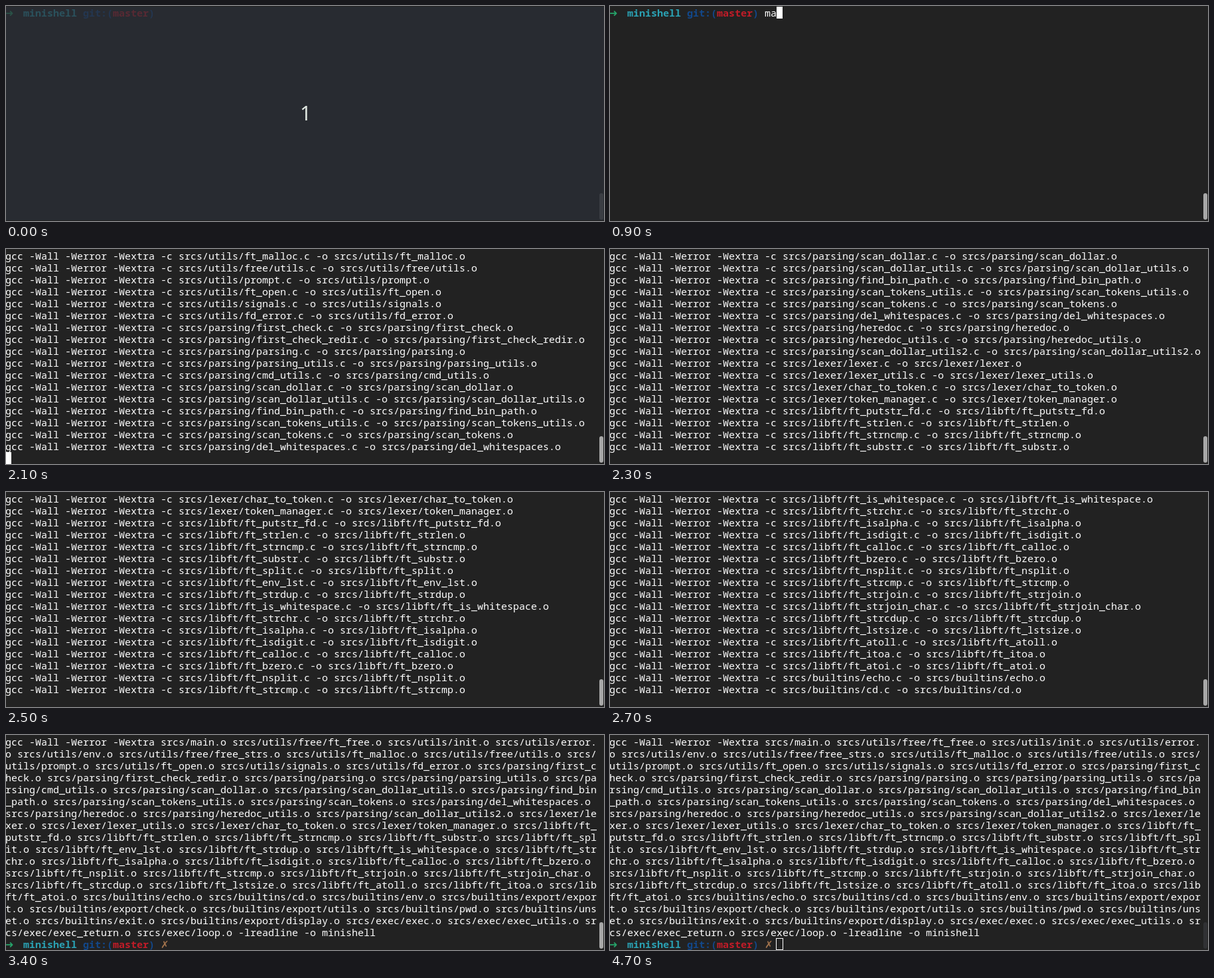
Recreate the animation shown at these times as an HTML page with a canvas. Size 901 by 325 pixels, loop 4.8 s.

```html
<!DOCTYPE html>
<html lang="en">
<head>
<meta charset="utf-8">
<title>Building minishell</title>
<style>
html, body { margin: 0; width: 100%; height: 100%; overflow: hidden; background: #222; }
canvas { display: block; }
</style>
</head>
<body>
<canvas id="stage" width="901" height="325"></canvas>
<script>
const ctx = document.getElementById('stage').getContext('2d');
const W = 901, H = 325, LOOP = 4800;
const CELL = 9, ROW = 18, LEFT = -1, TOP = 1, BASE = 15, ROWS = 18, COLS = 99;
const MONO = '15px "Noto Sans Mono", monospace';
const PLAIN = '500 ' + MONO, BOLD = 'bold ' + MONO;
const SYMBOL = 'bold 15px "DejaVu Sans", sans-serif';

const group = (dir, names) => names.split(' ').map(n => `srcs/${dir}${n}`);
const files = [
  ...group('', 'main'),
  ...group('utils/', 'free/ft_free init error env free/free_strs ft_malloc free/utils prompt ft_open signals fd_error'),
  ...group('parsing/', 'first_check first_check_redir parsing parsing_utils cmd_utils scan_dollar scan_dollar_utils ' +
    'find_bin_path scan_tokens_utils scan_tokens del_whitespaces heredoc heredoc_utils scan_dollar_utils2'),
  ...group('lexer/', 'lexer lexer_utils char_to_token token_manager'),
  ...group('libft/ft_', 'putstr_fd strlen strncmp substr split env_lst strdup is_whitespace strchr isalpha isdigit ' +
    'calloc bzero nsplit strcmp strjoin strjoin_char strcdup lstsize atoll itoa atoi'),
  ...group('builtins/', 'echo cd env export/export export/check export/utils pwd unset exit export/display'),
  ...group('exec/', 'exec exec_utils exec_return loop')
];

const GCC = 'gcc -Wall -Werror -Wextra ';
const compileLines = files.map(f => `${GCC}-c ${f}.c -o ${f}.o`);
const linkText = GCC + files.map(f => f + '.o').join(' ') + ' -lreadline -o minishell';
const linkLines = linkText.match(new RegExp(`.{1,${COLS}}`, 'g'));

// Last value whose start time has been reached
const at = (t, steps) => steps.reduce((v, [start, next]) => t >= start ? next : v, steps[0][1]);

const typed = [[0, ''], [900, 'ma'], [1100, 'mak'], [1200, 'make']];
const compiled = [[0, 0], [1700, 5], [1800, 10], [1900, 14], [2000, 19], [2100, 23], [2200, 28],
  [2300, 34], [2400, 40], [2500, 45], [2600, 49], [2700, 54], [2800, 59], [2900, 63]];
const cursorMode = [[0, 'off'], [100, 'solid'], [2200, 'off'], [2900, 'solid'], [3400, 'off'],
  [4000, 'solid'], [4600, 'hollow']];
const thumbColor = [[0, '#606060'], [100, '#8c8c8c'], [200, '#a8a8a8'], [4600, '#6c6c6c'], [4700, '#303134']];
const veilAlpha = [[0, 1], [100, 0.4], [200, 0]];

function put(text, col, row, color = '#fff', font = PLAIN) {
  ctx.font = font;
  ctx.fillStyle = color;
  ctx.fillText(text, LEFT + col * CELL, TOP + row * ROW + BASE);
}

function prompt(row, command, dirty) {
  put('➜', 0, row, '#26a269', SYMBOL);
  put('minishell', 3, row, '#2aa1b3', BOLD);
  put('git:(', 13, row, '#12488b', BOLD);
  put('master', 18, row, '#c01c28', BOLD);
  put(')', 24, row, '#12488b', BOLD);
  if (dirty) put('✗', 26, row, '#a2734c', SYMBOL);
  put(command, 26, row);
}

function cursor(col, row, mode) {
  const x = LEFT + col * CELL, y = TOP + row * ROW;
  if (mode === 'solid') {
    ctx.fillStyle = '#fff';
    ctx.fillRect(x, y, CELL, ROW);
  } else if (mode === 'hollow') {
    ctx.strokeStyle = '#fff';
    ctx.lineWidth = 1;
    ctx.strokeRect(x - 0.5, y + 0.5, CELL + 1, ROW - 1);
  }
}

function terminal(t) {
  const mode = at(t, cursorMode);
  if (t >= 3000) {
    linkLines.forEach((line, row) => put(line, 0, row));
    prompt(ROWS - 1, '', true);
    cursor(28, ROWS - 1, mode);
    return;
  }
  const command = at(t, typed), count = at(t, compiled);
  const scroll = Math.max(0, count + 2 - ROWS);
  if (!scroll) prompt(0, command, false);
  for (let i = Math.max(0, scroll - 1); i < count; i++) put(compileLines[i], 0, i + 1 - scroll);
  if (count) cursor(0, count + 1 - scroll, mode);
  else cursor(26 + command.length, 0, mode);
}

function scrollbar(t) {
  ctx.fillStyle = at(t, thumbColor);
  ctx.beginPath();
  ctx.roundRect(894, 283, 6, 40, 3);
  ctx.fill();
}

function countdown(alpha) {
  if (!alpha) return;
  ctx.globalAlpha = alpha;
  ctx.fillStyle = 'rgba(43, 47, 56, 0.7)';
  ctx.fillRect(0, 1, W, H - 2);
  ctx.fillStyle = '#dfe6e0';
  ctx.font = '30px "Noto Sans", sans-serif';
  ctx.textAlign = 'center';
  ctx.fillText('1', 451.5, 173);
  ctx.textAlign = 'left';
  ctx.globalAlpha = 1;
}

function draw(t) {
  ctx.fillStyle = '#222';
  ctx.fillRect(0, 0, W, H);
  terminal(t);
  scrollbar(t);
  countdown(at(t, veilAlpha));
}

const start = performance.now();
function tick() {
  draw((performance.now() - start) % LOOP);
  requestAnimationFrame(tick);
}
tick();
</script>
</body>
</html>
```
